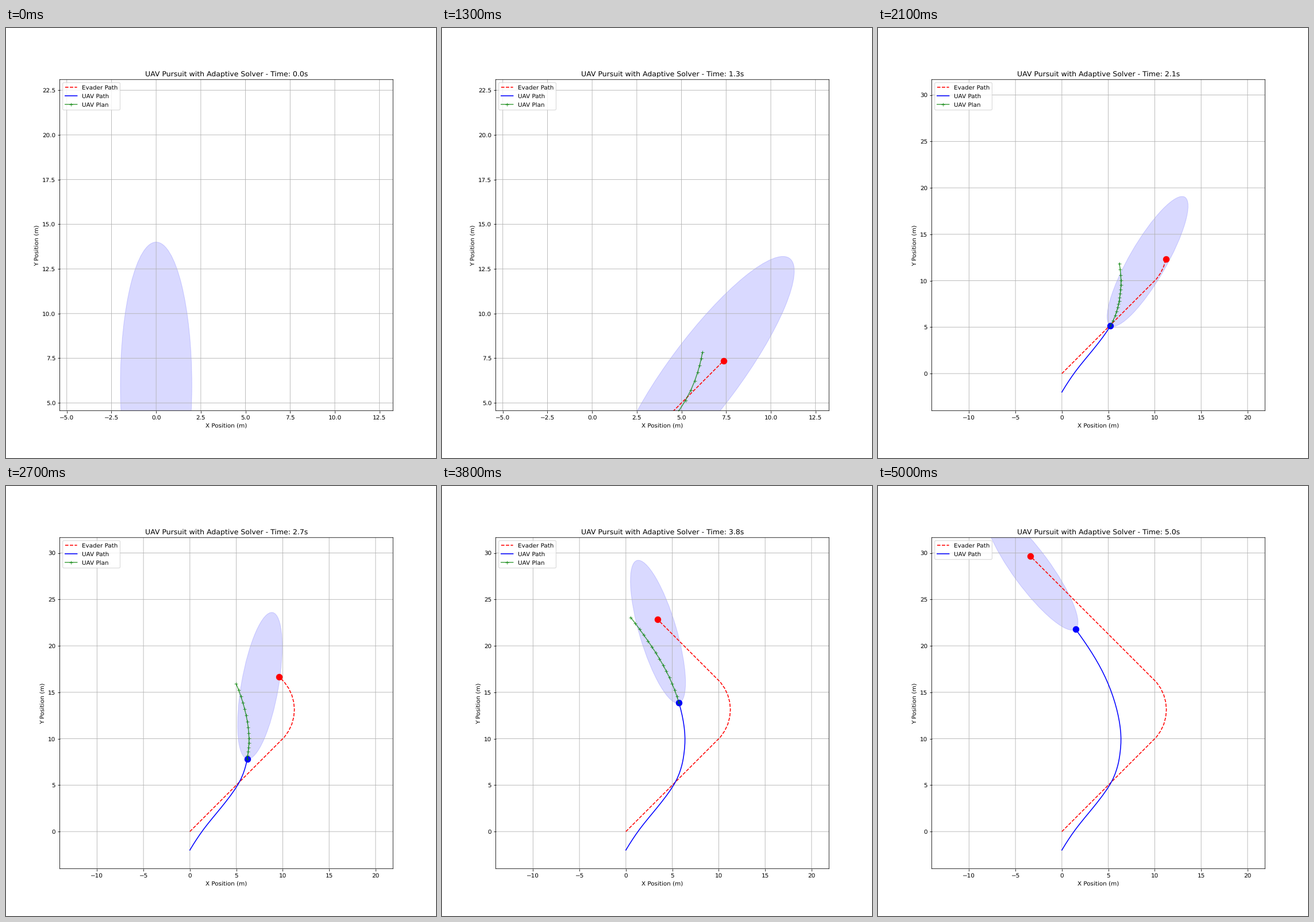
These frames come from a looping animation (748x748 px, 5100 ms). A matplotlib script:

```python
import numpy as np
import matplotlib.pyplot as plt
from matplotlib.animation import FuncAnimation
from matplotlib.patches import Ellipse

STEPS, DT = 51, 0.1
SPEED = 8.0
HORIZON = 14            # steps the UAV plans ahead
WAIT = 7                # steps before the UAV sets off
WIDE_VIEW = 18          # step at which the view zooms out

# Soft line positions, not rounded to whole pixels
plt.rcParams["path.snap"] = False
plt.rcParams["text.hinting"] = "none"


def spline(kt, kp, t):
    """Smooth curve through points kp at times kt, starting from rest."""
    h = np.diff(kt)[:, None]
    chord = np.diff(kp, axis=0) / h
    n = len(kt)
    system, rhs = np.eye(n), np.zeros_like(kp)
    for i in range(1, n - 1):
        a, b = 1 / h[i - 1, 0], 1 / h[i, 0]
        system[i, i - 1:i + 2] = a, 2 * (a + b), b
        rhs[i] = 3 * (a * chord[i - 1] + b * chord[i])
    rhs[-1] = chord[-1]
    slope = np.linalg.solve(system, rhs)

    t = np.clip(t, kt[0], kt[-1])
    i = np.clip(np.searchsorted(kt, t, side="right") - 1, 0, n - 2)
    h = h[i]
    u = (t - kt[i])[:, None] / h
    ease = u * u * (3 - 2 * u)
    return (kp[i] * (1 - ease) + kp[i + 1] * ease
            + h * u * (1 - u) * (slope[i] * (1 - u) - slope[i + 1] * u))


# Evader: straight run, 90 degree left turn in 10 degree steps, straight run
course = np.radians(45 + 10 * np.clip(np.arange(1, STEPS) - 18, 0, 9))
hops = SPEED * DT * np.column_stack([np.cos(course), np.sin(course)])
evader = np.vstack([[0, 0], np.cumsum(hops, axis=0)])

# UAV: waits, then chases through these (time, x, y) points;
# the path runs past the last step so that every plan is complete
route = np.array([
    (0.7, 0, -2), (1.3, 1.49, 0.26), (1.8, 3.86, 3.2), (2.1, 5.23, 5.15),
    (2.4, 5.9, 6.7), (2.8, 6.23, 8.2), (3.3, 6.34, 10.61), (3.8, 5.72, 13.85),
    (4.3, 4.36, 17.26), (5.0, 1.47, 21.8), (5.7, -1.88, 26.18),
    (6.4, -5.2, 30.6)])
times = DT * np.arange(STEPS + HORIZON)
uav = spline(route[:, 0], route[:, 1:], times)

# Unit view direction: towards the evader while waiting, then along the path
view = np.gradient(uav, axis=0)
view[:WAIT + 1] = (evader - uav[:STEPS])[:WAIT + 1]
view /= np.linalg.norm(view, axis=1)[:, None]


fig, ax = plt.subplots(figsize=(10, 10), dpi=74.8)
ax.grid(True)
ax.set_xlabel("X Position (m)")
ax.set_ylabel("Y Position (m)")

sensor = Ellipse((0, 6), 4, 16, color="blue", alpha=0.15)
ax.add_patch(sensor)
evader_line, = ax.plot([], [], "r--", label="Evader Path")
evader_dot, = ax.plot([], [], "ro", markersize=10)
uav_line, = ax.plot([], [], "b-", label="UAV Path")
uav_dot, = ax.plot([], [], "bo", markersize=10)
plan_line, = ax.plot([], [], "g+-", alpha=0.7, label="UAV Plan")

# Two equal-scale views sharing one centre, 2 m around both paths
paths = np.vstack([evader, uav[:STEPS]])
low, high = paths.min(axis=0) - 2, paths.max(axis=0) + 2
centre, size = (low + high) / 2, high - low
ratio = 0.77 / 0.775


def set_view(width):
    left, bottom = centre - np.array([width, width * ratio]) / 2
    ax.set_xlim(left, left + width)
    ax.set_ylim(bottom, bottom + width * ratio)


def draw(k):
    set_view(size[0] if k < WIDE_VIEW else size[1] / ratio)
    tracks = (evader, evader_line, evader_dot), (uav, uav_line, uav_dot)
    for path, line, dot in tracks:
        line.set_data(*path[:k + 1].T)
        dot.set_data(*path[k:k + 1].T)

    sensor.set_center(uav[k] + 8 * view[k])
    sensor.set_angle(-np.degrees(np.arctan2(*view[k])))

    handles = [evader_line, uav_line]
    planning = k < STEPS - 1
    plan_line.set_visible(planning)
    if planning:
        plan_line.set_data(*uav[k:k + HORIZON + 1].T)
        handles.append(plan_line)
    ax.legend(handles=handles, loc="upper left")
    ax.set_title(f"UAV Pursuit with Adaptive Solver - Time: {times[k]:.1f}s")
    return []


anim = FuncAnimation(fig, draw, frames=STEPS, interval=100,
                     init_func=lambda: draw(0), repeat=True, repeat_delay=0)
plt.show()
```
